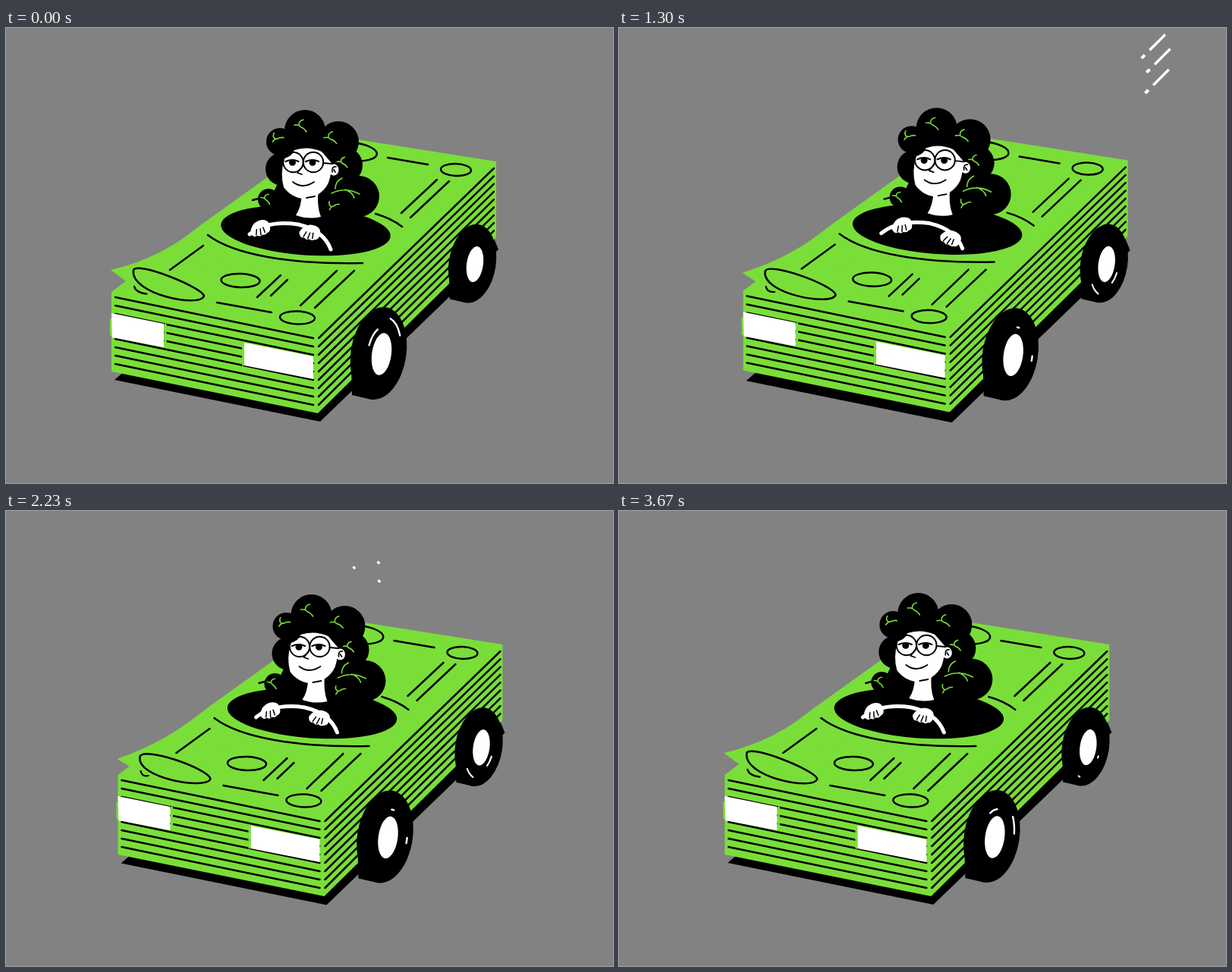
These frames come from a looping animation (800 by 600 pixels, 3710 ms). An HTML page with a canvas:

```html
<!DOCTYPE html>
<html lang="en">
<head>
<meta charset="utf-8">
<title>Banknote car</title>
<style>
  html, body { margin: 0; width: 100%; height: 100%; overflow: hidden; background: #828282; }
  canvas { display: block; }
</style>
</head>
<body>
<canvas id="stage" width="800" height="600"></canvas>
<script>
const ctx = document.getElementById('stage').getContext('2d');
const LOOP = 3710, SPIN = LOOP / 8, BURST = LOOP / 7;
const GREEN = '#7ade39', BLACK = '#000', WHITE = '#fff', GREY = '#828282';

const smooth = u => { u = Math.min(1, Math.max(0, u)); return u * u * (3 - 2 * u); };

// Two swerves per loop, the first one wider.
function drift(t) {
  const u = 2 * t / LOOP;
  return (u < 1 ? 34 : 18.5) * Math.abs(Math.sin(Math.PI * u)) ** 1.5;
}

// Eased moves between a few poses.
const beats = [0, 370, 930, 1630, 2230, 3070, 3670, LOOP];
const ease = (...poses) => t => {
  const i = beats.findIndex(b => b > t) - 1;
  const from = poses[i], to = poses[(i + 1) % poses.length];
  return from + (to - from) * smooth((t - beats[i]) / (beats[i + 1] - beats[i]));
};
const bodyBob = ease(0, 3, .5, -3, 0, .5, 0);
const headBob = ease(0, 6, -5.5, 2, 2, -.5, 0);
const cornerLift = ease(23, 3, 32, 6, 15, 37, 23);

function fill(color, shape) {
  ctx.fillStyle = color;
  ctx.fill(typeof shape === 'string' ? new Path2D(shape) : shape);
}
function stroke(color, width, shape) {
  ctx.strokeStyle = color;
  ctx.lineWidth = width;
  ctx.stroke(typeof shape === 'string' ? new Path2D(shape) : shape);
}
function oval(x, y, rx, ry = rx, tilt = 0, from = 0, to = 360) {
  const p = new Path2D(), rad = Math.PI / 180;
  p.ellipse(x, y, rx, ry, tilt * rad, from * rad, to * rad);
  return p;
}
function at(x, y, draw, turn = 0) {
  ctx.save();
  ctx.translate(x, y);
  ctx.rotate(turn * Math.PI / 180);
  draw();
  ctx.restore();
}

// Three parallel streaks fly down-left from each burst's origin.
const origins = [[688, 56], [462, 67], [727, 27], [640, 75], [492, 67], [759, 70], [680, 115]];
function speedLines(t) {
  const time = (t - 105 + LOOP) % LOOP, age = time % BURST;
  const index = Math.floor(time / BURST), [x, y] = origins[index];
  const head = 156 * smooth(age / 400), tail = 156 * smooth((age - 120) / 400);
  if (tail > 155) return;
  ctx.lineCap = 'butt';
  at(x, y, () => {
    for (const side of [-1, 0, 1]) {
      const shift = side * 28 * Math.sin(index * 2.3 + side + 3);
      at(shift, -18 * side, () => {
        stroke(WHITE, 4, `M${Math.max(tail, head - 3)} 0H${head + 3}`);
        if (head - 12 > tail) stroke(WHITE, 3.4, `M${tail} 0H${head - 12}`);
      });
    }
  }, 135);
  ctx.lineCap = 'round';
}

function stack() {
  fill(GREEN, 'M139 348L262 256L428 137L463 147L646 176V276L411 508L139 453Z');
  let lines = '';
  for (let i = 0; i < 9; i++) {
    const front = 409 + 11 * i;
    lines += `M144 ${front - 54}L405 ${front}M412 ${front}L643 ${185 + 10.3 * i}`;
  }
  stroke(BLACK, 2.5, lines);
  fill(GREEN, 'M137 384L141 380V410L137 405Z');
  fill(WHITE, 'M139 376L208 390V421L140 408ZM314 415L405 433V463L314 445Z');
  stroke(GREEN, 3, 'M210 391V420M312.5 416V444M407.5 434V463');
}

// The loose corner of the top note; its oval sags as the tip rises.
function corner(lift) {
  fill(GREEN, `M138 ${342 - lift}Q205 304 262 256L300 300L190 358Z`);
  const left = 333 - .6 * lift, right = 353;
  const up = 18 - .27 * lift, down = 18 + .27 * lift;
  stroke(BLACK, 2.5, `M168 ${left}C172 ${left - up} 257 ${right - up} 261 ${right}
    C257 ${right + down * .7} 163 ${left + down * 1.3} 168 ${left}Z`);
  const reach = smooth((lift - 14) / 20);
  if (reach) stroke(BLACK, 2.2, `M169 ${343 - 5 * reach}q2 8 ${10 + 15 * reach} ${6 + 9 * reach}`);
}

function noteArt() {
  stroke(BLACK, 2.5, `M260 287L216 319M362 326L331 355M371 332L349 353M436 320L388 366M459 320L407 369
    M278 362L350 375M503 171L556 180M568 200L521 244M584 202L533 250
    M266 273C300 299 375 312 470 310M487 245Q508 251 522 262M325 227L336 224`);
  stroke(BLACK, 2.5, oval(309, 333, 25.5, 9, 2));
  stroke(BLACK, 2.5, oval(384, 382, 23, 8.5, 2));
  stroke(BLACK, 2.5, oval(593, 187, 20, 8, 2));
  stroke(BLACK, 2.5, oval(456, 163, 33, 12, 6));
  fill(BLACK, oval(395, 267, 112, 32.5, 4));
}

function sprig(x, y, turn, size = 1) {
  at(x, y, () => {
    ctx.scale(size, size);
    stroke(GREEN, 1.6 / size, 'M-8 -2Q-2 -3 1 1Q5 2 8 7M-2 -2Q-2 -8 4 -9');
  }, turn);
}

function driver() {
  fill(BLACK, 'M360 150H446L466 200L472 246H346L350 222L358 205Z');
  for (const [x, y, r] of [[394, 135, 27], [438, 150, 27], [361, 150, 18], [364, 186, 22],
    [346, 226, 14], [446, 181, 24], [465, 222, 27]]) fill(BLACK, oval(x, y, r));

  fill(WHITE, 'M390 218L412 212Q409 234 415 249Q399 253 382 247Q389 237 390 218Z');
  fill(WHITE, 'M380 161Q398 155 416 163Q423 171 429 178Q429 193 425 204Q418 219 399 225Q379 227 366 210Q361 192 367 172Q377 169 380 161Z');
  fill(WHITE, oval(432, 187, 6.5, 7.5));
  stroke(BLACK, 1.7, 'M430 190Q429 182 435 183M432 187L434 190');

  for (const x of [378.5, 405]) {
    stroke(BLACK, 2, oval(x, 177, 13.2));
    stroke(BLACK, 2.2, `M${x - 10} 176Q${x - 1} 172 ${x + 7} 176`);
    fill(BLACK, oval(x - 1, 177.5, 4.5, 4.2));
  }
  stroke(BLACK, 1.8, 'M418 178L429 179M391 182L384 191L390 193M378 203Q391 213 406 203M396 224L407 222');

  sprig(388, 130, 0);
  sprig(357, 146, -50, .85);
  sprig(427, 146, -5);
  sprig(443, 178, 0, .85);
  sprig(431, 235, -60, .8);
  sprig(342, 226, 8, .8);
  stroke(GREEN, 1.6, 'M429 218Q447 209 466 219M434 212Q434 202 443 198M447 213Q457 217 459 224');
}

function hand(x, y, turn) {
  at(x, y, () => {
    fill(WHITE, 'M-13 4Q-10 -8 1 -10Q13 -11 14 -2Q15 7 9 8Q6 11 2 9Q-1 12 -5 9Q-10 12 -13 4Z');
    stroke(BLACK, 1.5, 'M-6 8L-4 1M0 9L1 1M6 7L5 0');
  }, turn);
}

function steering(turn) {
  stroke(WHITE, 5, 'M321 272Q345 253 385 259Q419 267 428 292');
  hand(334 + turn, 264 - turn * .2, -12 + turn * .5);
  hand(400 + turn * .9, 269 + turn * .65, 16 + turn);
}

// A highlight sweeps counter-clockwise, its tail catching up with its head.
function shine(rx, ry, start, age) {
  const head = smooth((age - 40) / 330), tail = smooth((age - 70) / 385);
  if (age < 45 || tail > .9995) return;
  stroke(WHITE, 2.4, oval(0, 0, rx, ry, 8, -start - 260 * head, -start - 260 * tail));
}
function wheel(x, y, scale, age) {
  at(x, y, () => {
    ctx.scale(scale, scale);
    fill(BLACK, oval(-4, -1, 36.5, 61.5, 9));
    fill(BLACK, 'M-40 15L-39 54L-13 60L10 20Z');
    fill(WHITE, oval(0, 0, 12.8, 28, 8));
    shine(25, 49, -5, age);
    shine(18.5, 37, 82, age);
  });
}

function draw(t) {
  const x = drift(t), bob = bodyBob(t), ground = x / 20;
  ctx.lineCap = ctx.lineJoin = 'round';
  ctx.fillStyle = GREY;
  ctx.fillRect(0, 0, 800, 600);
  speedLines(t);

  at(x, 0, () => {
    at(0, ground, () => fill(BLACK, 'M143 464L165 445L640 270L649 292L414 519Z'));
    at(0, bob, () => {
      stack();
      corner(cornerLift(t));
      noteArt();
      at(0, headBob(t), driver);
      steering(x * .55);
    });
    wheel(618, 311.5 + bob + ground, .85, t % SPIN);
    wheel(495, 430 + ground, 1, (t + SPIN - 300) % SPIN);
  });
}

const begin = performance.now();
function play() {
  draw((performance.now() - begin) % LOOP);
  requestAnimationFrame(play);
}
play();
</script>
</body>
</html>
```
